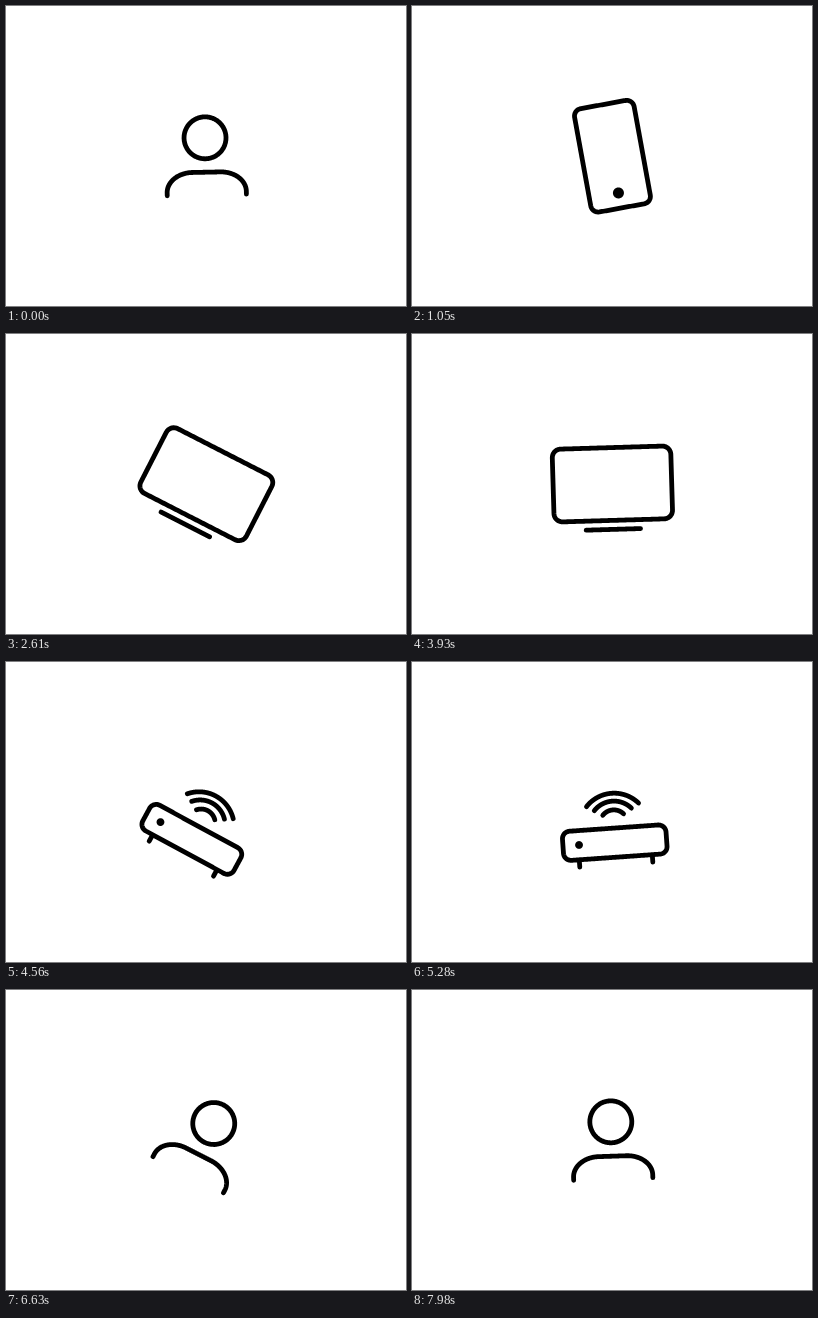
An HTML page with a canvas for the animation above (8.04 s loop, 400 by 300 pixels).

```html
<!DOCTYPE html>
<html lang="en">
<head>
<meta charset="utf-8">
<title>Morphing icons</title>
<style>
html, body { margin: 0; width: 100%; height: 100%; overflow: hidden; background: #fff; }
canvas { display: block; }
</style>
</head>
<body>
<canvas id="stage" width="400" height="300"></canvas>
<script>
const ctx = document.getElementById('stage').getContext('2d');
const LOOP = 8040, STEP = 30, STAGE = LOOP / 4;
const N = 240, LINE = 4.8, MORPH = 130;

const lerp = (a, b, k) => a + (b - a) * k;
const clamp = (v) => Math.max(0, Math.min(1, v));

// Points on an elliptical arc; angles in degrees, clockwise on screen.
function arc(cx, cy, rx, ry, from, to) {
  const pts = [];
  for (let i = 0; i <= 48; i++) {
    const a = lerp(from, to, i / 48) * Math.PI / 180;
    pts.push([cx + rx * Math.cos(a), cy + ry * Math.sin(a)]);
  }
  return pts;
}

// Spread N points evenly along a polyline.
function resample(src, closed) {
  const pts = closed ? [...src, src[0]] : src;
  const len = [0];
  for (let i = 1; i < pts.length; i++) {
    len.push(len[i - 1] + Math.hypot(pts[i][0] - pts[i - 1][0], pts[i][1] - pts[i - 1][1]));
  }
  const total = len[len.length - 1], out = [];
  let j = 1;
  for (let i = 0; i < N; i++) {
    const d = total * i / (closed ? N : N - 1);
    while (j < pts.length - 1 && len[j] < d) j++;
    const k = clamp((d - len[j - 1]) / (len[j] - len[j - 1] || 1));
    out.push([lerp(pts[j - 1][0], pts[j][0], k), lerp(pts[j - 1][1], pts[j][1], k)]);
  }
  return out;
}

const part = (pts, closed = false, width = LINE) => ({ pts: resample(pts, closed), closed, width });
const line = (x1, y1, x2, y2) => part([[x1, y1], [x2, y2]]);
const ring = (x, y, r) => part(arc(x, y, r, r, 0, 360).slice(0, -1), true);
const dot = (x, y, r) => part(arc(x, y, r / 2, r / 2, 0, 360).slice(0, -1), true, r);
const wave = (x, y, r) => part(arc(x, y, r, r, -138, -42));
const speck = (x, y) => part([[x, y], [x, y]], false, 0);

function box(cx, cy, w, h, r) {
  const x = w / 2 - r, y = h / 2 - r;
  return part([
    ...arc(cx - x, cy + y, r, r, 90, 180),
    ...arc(cx - x, cy - y, r, r, 180, 270),
    ...arc(cx + x, cy - y, r, r, 270, 360),
    ...arc(cx + x, cy + y, r, r, 0, 90)
  ], true);
}

// Icons are drawn around the stage centre.
const person = [
  part([[-39.6, 39], ...arc(-14, 36, 25.6, 19.8, 180, 270),
    ...arc(14, 36, 25.6, 19.8, 270, 360), [39.6, 39]]),
  ring(-0.6, -18.2, 21)
];
const phone = [box(0.4, 0.3, 60.5, 105, 7.5), dot(-0.3, 37.5, 5.5)];
const screen = [box(0.4, 0, 118.6, 72.8, 8.5), line(-27.2, 45.4, 27.2, 45.4)];
const router = [
  box(0.6, 30.8, 103.8, 29.2, 7.5),
  wave(1, 16.4, 35.1), wave(1, 14.2, 25), wave(1, 12, 14),
  dot(-35.2, 30.6, 3.9),
  line(-36, 47, -36, 52.8), line(37.2, 47, 37.2, 52.8)
];
const icons = [person, phone, screen, router];
for (const icon of icons) while (icon.length < router.length) icon.push(speck(0, 10));

const roll = (pts, n) => pts.slice(n).concat(pts.slice(0, n));

// Shift a closed outline's start so that its points lie nearest the other one's.
function bestRoll(pts, goal) {
  let best = 0, low = Infinity;
  for (let s = 0; s < N; s += 2) {
    let sum = 0;
    for (let i = 0; i < N; i += 6) {
      const p = pts[(i + s) % N], q = goal[i];
      sum += (p[0] - q[0]) ** 2 + (p[1] - q[1]) ** 2;
    }
    if (sum < low) { low = sum; best = s; }
  }
  return roll(pts, best);
}

// The next icon is laid out a quarter turn behind the current one.
const pairs = icons.map((icon, i) => icon.map((a, j) => {
  const b = icons[(i + 1) % icons.length][j];
  let from = a.pts.map(([x, y]) => [-y, x]), to = b.pts;
  if (b.closed) to = bestRoll(to, from);
  else if (a.closed) from = bestRoll(from, to);
  return { a, b, from, to };
}));

// Swing after the turn: time in ms, angle in degrees.
const swing = [[540, 28.5], [1030, -10.4], [1500, 2.8], [1985, -1.9], [2400, 0]];

function tilt(t) {
  if (t < 540) return lerp(-91.2, 28.5, 1 - (1 - t / 540) ** 2.8);
  let i = 0;
  while (t > swing[i + 1][0]) i++;
  const [t0, a0] = swing[i], [t1, a1] = swing[i + 1];
  return lerp(a0, a1, (1 - Math.cos(Math.PI * (t - t0) / (t1 - t0))) / 2);
}

function drawPart({ a, b, from, to }, m) {
  const width = lerp(a.width, b.width, m);
  if (width < 0.05) return;
  ctx.beginPath();
  for (let i = 0; i < N; i++) {
    ctx.lineTo(lerp(from[i][0], to[i][0], m), lerp(from[i][1], to[i][1], m));
  }
  if ((a.closed && b.closed) || (m === 0 && a.closed) || (m === 1 && b.closed)) ctx.closePath();
  ctx.lineWidth = width;
  ctx.stroke();
}

function draw(time) {
  const t = Math.min(Math.floor(time / STEP) * STEP, LOOP - 2 * STEP);
  const stage = Math.floor(t / STAGE), local = t - stage * STAGE;
  const k = clamp(local / MORPH), m = k * k * (3 - 2 * k);
  ctx.setTransform(1, 0, 0, 1, 0, 0);
  ctx.fillStyle = '#fff';
  ctx.fillRect(0, 0, 400, 300);
  ctx.translate(200, 150);
  ctx.rotate(tilt(local) * Math.PI / 180);
  ctx.strokeStyle = '#000';
  ctx.lineCap = ctx.lineJoin = 'round';
  for (const pair of pairs[stage]) drawPart(pair, m);
}

const start = performance.now();
function tick() {
  draw((performance.now() - start) % LOOP);
  requestAnimationFrame(tick);
}
tick();
</script>
</body>
</html>
```
